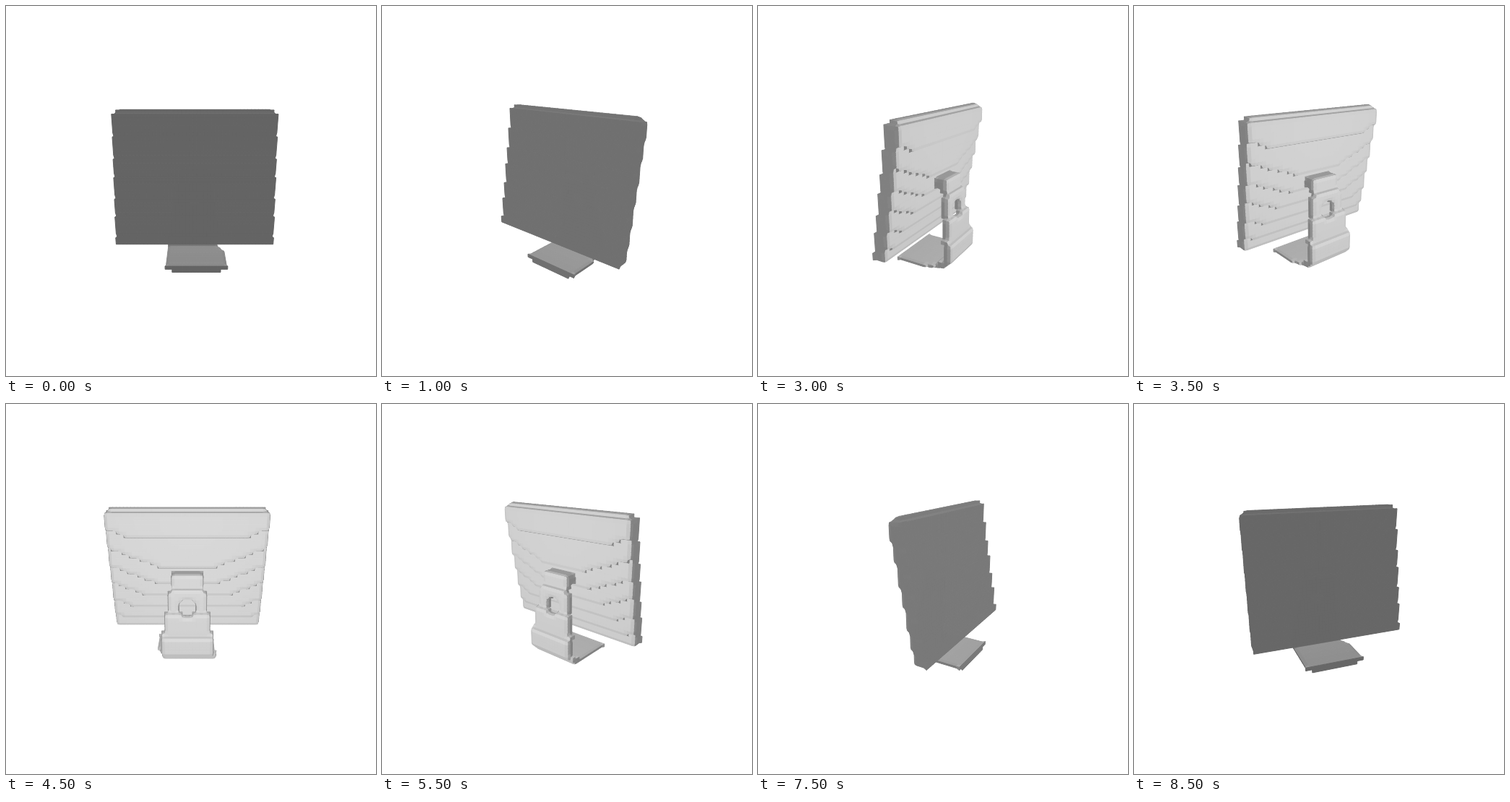
Animation, 512 px wide and 512 px high, one loop 9000 ms. Source, as an HTML page with a canvas:

```html
<!DOCTYPE html>
<html lang="en">
<head>
<meta charset="utf-8">
<title>Monitor turntable</title>
<style>
  html, body { margin: 0; width: 100%; height: 100%; overflow: hidden; background: #fff; }
  canvas { display: block; width: 100vw; height: 100vh; }
</style>
</head>
<body>
<canvas id="stage" width="512" height="512"></canvas>
<script>
const ctx = document.getElementById('stage').getContext('2d');
const VOXEL = 4.7, OFFSET = [4.9, 0, 0.75];
const STEPS = 18, STEP_MS = 500;
const DISTANCE = 500, PITCH = Math.atan(0.35);
const round = Math.round, abs = Math.abs;

// The model is a solid made of voxels: i to the right, j up, k towards the screen side.
function panel(i, j, k) {
  if (j === 23) return abs(i) <= 21 && (k === -1 || k === 0);
  if (abs(i) > 22 || j < -13 || j > 22) return false;
  const bulge = 0.073 * Math.min(22 - abs(i), 22 - j, j + 13);
  const back = -2 + round((20.6 - j) / 5.47 - bulge);
  const front = 1 + Math.max(0, round((19 - j) / 5.47));
  return k >= back && k <= front;
}

function support(i, j, k) {
  if (j > 5 || j < -18) return false;
  const halfWidth = Math.min(7, 4 + Math.max(0, Math.ceil((1 - j) / 6)));
  const back = round(-3.9 - 0.14 * (6 - j));
  const inHole = i * i + (j + 4) ** 2 < 7;
  const depth = j >= 3 ? 6 : 1;
  return abs(i) <= halfWidth && !inHole && k >= back && k <= back + depth;
}

function base(i, j, k) {
  if (k < -6 || k > 9) return false;
  const bottom = -21 + Math.max(0, Math.ceil((-3 - k) / 2));
  const inset = j === -21 ? 1.5 : 0;
  return (j === bottom || j === bottom + 1) &&
    i >= -8 + inset && i <= Math.max(7, Math.min(9, 9.6 + 0.7 * k)) - inset;
}

const solid = (i, j, k) => panel(i, j, k) || support(i, j, k) || base(i, j, k);

// Bevelled corner: the mean of all surface crossings between its eight voxels.
// Corners on the screen side stay sharp.
const corners = new Map();
function corner(at) {
  const key = at.join();
  if (corners.has(key)) return corners.get(key);
  const sum = [0, 0, 0];
  let count = 0;
  for (let n = 0; n < 8; n++) {
    const low = [n & 1, n >> 1 & 1, n >> 2 & 1];
    const cell = at.map((v, a) => v - low[a]);
    const filled = solid(...cell);
    let inward = 0;
    for (let axis = 0; axis < 3; axis++) {
      if (!low[axis]) continue;
      const next = cell.slice();
      next[axis]++;
      if (solid(...next) === filled) continue;
      count++;
      for (let a = 0; a < 3; a++) if (a !== axis) sum[a] += 0.5 - low[a];
    }
  }
  const bevel = sum[2] < 0 ? 0 : 1 / count;
  const point = at.map((v, a) => (v - 0.5 + sum[a] * bevel) * VOXEL + OFFSET[a]);
  corners.set(key, point);
  return point;
}

const sub = (a, b) => a.map((v, n) => v - b[n]);
const dot = (a, b) => a[0] * b[0] + a[1] * b[1] + a[2] * b[2];
const unit = a => a.map(v => v / (Math.hypot(...a) || 1));
const cross = (a, b) => [
  a[1] * b[2] - a[2] * b[1], a[2] * b[0] - a[0] * b[2], a[0] * b[1] - a[1] * b[0]
];

const LAMP = [0, 100, -400];
function light(points) {
  const center = [0, 1, 2].map(a => points.reduce((s, p) => s + p[a], 0) / 4);
  const [x, y, z] = center;
  const onScreen = abs(x - 4.9) < 104 && y > -62 && y < 103 && z > 2 + 0.183 * (93 - y);
  if (onScreen) return { lamp: 0, sky: 0 };
  const normal = unit(cross(sub(points[2], points[0]), sub(points[3], points[1])));
  return {
    lamp: Math.max(0, dot(normal, unit(sub(LAMP, center)))),
    sky: Math.max(0, normal[1])
  };
}

function buildQuads() {
  const quads = [];
  const addFace = (cell, axis, side) => {
    const u = (axis + 1) % 3, v = (axis + 2) % 3;
    const points = [[0, 0], [1, 0], [1, 1], [0, 1]].map(([du, dv]) => {
      const at = cell.slice();
      at[axis] += side;
      at[u] += du;
      at[v] += dv;
      return corner(at);
    });
    if (!side) points.reverse();
    quads.push({ points, ...light(points) });
  };
  for (let i = -24; i <= 24; i++)
    for (let j = -24; j <= 24; j++)
      for (let k = -11; k <= 12; k++) {
        if (!solid(i, j, k)) continue;
        for (let axis = 0; axis < 3; axis++)
          for (const side of [0, 1]) {
            const next = [i, j, k];
            next[axis] += side ? 1 : -1;
            if (!solid(...next)) addFace([i, j, k], axis, side);
          }
      }
  return quads;
}

const quads = buildQuads();
const sinP = Math.sin(PITCH), cosP = Math.cos(PITCH);

function draw(angle) {
  const s = Math.sin(angle), c = Math.cos(angle);
  // Surfaces darken when the screen faces the viewer and brighten when the back does.
  const ambient = 128 - 28 * Math.max(0, c) ** 2;
  const lampPower = 74 + 14 * Math.max(0, -c) ** 2;
  const project = ([x, y, z]) => {
    const turnedX = x * c - z * s, turnedZ = x * s + z * c;
    const near = y * sinP + turnedZ * cosP;
    const scale = DISTANCE / (DISTANCE - near);
    return [256 + scale * turnedX, 256 - scale * (y * cosP - turnedZ * sinP), near];
  };
  const visible = [];
  for (const { points, lamp, sky } of quads) {
    const p = points.map(project);
    const area = (p[2][0] - p[0][0]) * (p[3][1] - p[1][1]) - (p[2][1] - p[0][1]) * (p[3][0] - p[1][0]);
    if (area >= 0) continue;
    const grey = round(ambient + lampPower * lamp + 10 * sky);
    visible.push({
      p,
      color: `rgb(${grey},${grey},${grey})`,
      near: p[0][2] + p[1][2] + p[2][2] + p[3][2]
    });
  }
  visible.sort((a, b) => a.near - b.near);

  ctx.fillStyle = '#fff';
  ctx.fillRect(0, 0, 512, 512);
  ctx.lineWidth = 1;
  ctx.lineJoin = 'round';
  for (const { p, color } of visible) {
    ctx.fillStyle = ctx.strokeStyle = color;
    ctx.beginPath();
    for (const [x, y] of p) ctx.lineTo(x, y);
    ctx.closePath();
    ctx.fill();
    ctx.stroke();
  }
}

let shown = -1;
function tick() {
  const step = Math.floor(performance.now() / STEP_MS) % STEPS;
  if (step !== shown) {
    shown = step;
    draw(step / STEPS * 2 * Math.PI);
  }
  requestAnimationFrame(tick);
}
tick();
</script>
</body>
</html>
```
